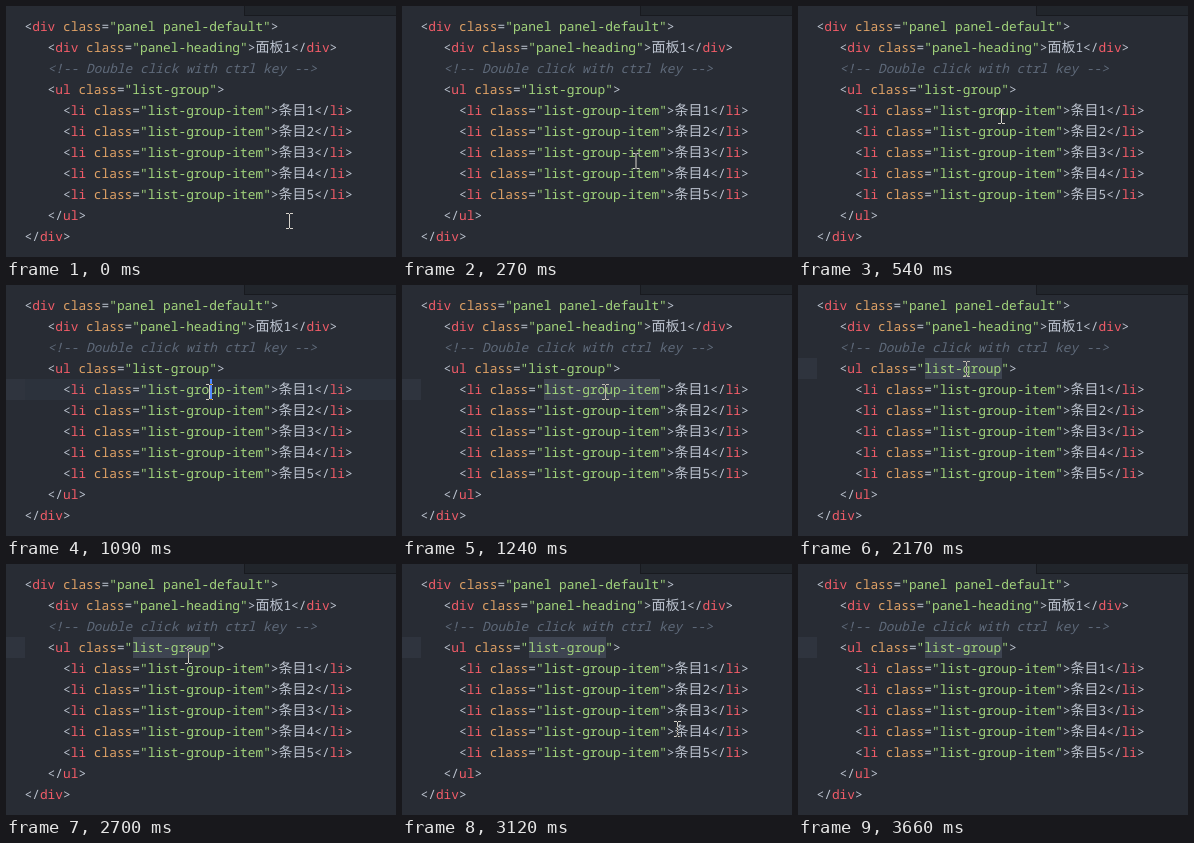
Recreate the animation shown at these times as an HTML page. Size 390x251 px, loop 3.94 s.

```html
<!DOCTYPE html>
<html lang="zh">
<head>
<meta charset="utf-8">
<title>Code editor</title>
<style>
  html, body { margin: 0; width: 100%; height: 100%; overflow: hidden; background: #282c34; }
  #stage { position: relative; width: 390px; height: 251px; overflow: hidden; background: #282c34; isolation: isolate; }
  #stage > * { position: absolute; }
  .tabs { box-sizing: border-box; background: #21252b; border: solid #181a1f; border-width: 0 0 1px 1px; }
  .line { height: 21px; margin-left: -.5px; white-space: pre; color: #bcc3cf; text-rendering: geometricPrecision;
          font: 12.83px/21px "Noto Sans Mono", "DejaVu Sans Mono", monospace; font-variant-ligatures: none; }
  .tag { color: #f25c68; }
  .attr { color: #e0a266; }
  .str { color: #a2d47c; }
  .note { color: #5f6a7a; font-style: italic; }
  .cjk { font: 14px/0 "Noto Sans CJK SC", "Noto Sans CJK", sans-serif; }
  .active { background: #2c323c; }
  .gutter { background: #2f343e; }
  .selection { background: #3e4451; }
  .caret, .underline { background: #528bff; }
  .mouse { mix-blend-mode: difference; }
  .mouse svg { display: block; }
</style>
</head>
<body>
<div id="stage"></div>
<script>
const LOOP = 3940, LEFT = 19, TOP = 10, CHAR = 7.697, ROW = 21, WIDTH = 390;
const stage = document.getElementById('stage');

const colX = col => Math.round(LEFT + col * CHAR);
const rowY = row => TOP + row * ROW;

function add(className, x, y, width, height, html = '') {
  const el = document.createElement('div');
  el.className = className;
  el.style.cssText = `left:${x}px;top:${y}px;width:${width}px;height:${height}px`;
  el.innerHTML = html;
  stage.append(el);
  return el;
}

const loop = (el, frames) => el.animate(frames, { duration: LOOP, iterations: Infinity });

function showBetween(el, from, to) {
  const changes = [[0, 0], [from, 1], [to, 0], [LOOP, 0]];
  loop(el, changes.map(([time, opacity]) => ({ offset: time / LOOP, opacity, easing: 'step-end' })));
}

const span = (kind, text) => `<span class="${kind}">${text}</span>`;
const open = (tag, cls) =>
  `&lt;${span('tag', tag)} ${span('attr', 'class')}=${span('str', `"${cls}"`)}&gt;`;
const close = tag => `&lt;/${span('tag', tag)}&gt;`;
const element = (tag, cls, word, n) => open(tag, cls) + span('cjk', word) + n + close(tag);

const source = [
  [0, open('div', 'panel panel-default')],
  [3, element('div', 'panel-heading', '面板', 1)],
  [3, span('note', '&lt;!-- Double click with ctrl key --&gt;')],
  [3, open('ul', 'list-group')],
  ...[1, 2, 3, 4, 5].map(n => [5, element('li', 'list-group-item', '条目', n)]),
  [3, close('ul')],
  [0, close('div')],
];
const LAST = source.length - 1;

add('tabs', 238, 0, WIDTH - 238, TOP);
const lines = source.map(([indent, html], row) =>
  add('line', LEFT + indent * CHAR, rowY(row), WIDTH, ROW, html));
lines.forEach(line => { line.style.zIndex = 1; });

const findCol = (row, word) => source[row][0] + lines[row].textContent.indexOf(word);

function markRow(row, from, activeUntil, gutterUntil) {
  showBetween(add('active', 0, rowY(row), WIDTH, ROW), from, activeUntil);
  showBetween(add('gutter', 0, rowY(row), LEFT, ROW), from, gutterUntil);
}

// The first click places the caret, the second selects the word.
function doubleClick({ row, word, letter, press, select, until }) {
  const col = findCol(row, word), x = colX(col);
  markRow(row, press, select, until);
  showBetween(add('selection', x, rowY(row), colX(col + word.length) - x, ROW), select, until);
  const caret = add('caret', colX(col + letter), rowY(row), 2, ROW);
  caret.style.zIndex = 2;
  showBetween(caret, press, select);
}

markRow(LAST, 0, 1090, 1090);
doubleClick({ row: 4, word: 'list-group-item', letter: 8, press: 1090, select: 1240, until: 2170 });
doubleClick({ row: 3, word: 'list-group', letter: 5, press: 1890, select: 2170, until: LOOP });

for (const row of [0, LAST])
  showBetween(add('underline', colX(findCol(row, 'div')), rowY(row + 1) - 1, 23, 1), 0, 1240);

const mouse = add('mouse', 0, 0, 7, 16,
  '<svg width="7" height="16" shape-rendering="crispEdges">' +
  '<path d="M0 .5h3m1 0h3M3.5 1v14M0 15.5h3m1 0h3" stroke="#fff" fill="none"/></svg>');
mouse.style.zIndex = 3;

// Key points: time, x, y and the number of jumps to the next point.
const path = [
  [0, 280, 207, 1], [120, 261, 184, 2], [390, 200, 110, 1], [540, 200, 102, 2], [810, 200, 99, 1],
  [1490, 177, 86, 1], [1640, 165, 76, 1], [2700, 179, 84, 1], [2820, 214, 110, 1],
  [2970, 259, 147, 1], [3120, 272, 157, 2], [3390, 313, 202, 2], [3660, 363, 270, 1], [LOOP, 363, 270, 1],
];
loop(mouse, path.map(([time, x, y, jumps]) => ({
  offset: time / LOOP,
  transform: `translate(${x}px, ${y}px)`,
  easing: `steps(${jumps}, end)`,
})));
</script>
</body>
</html>
```
